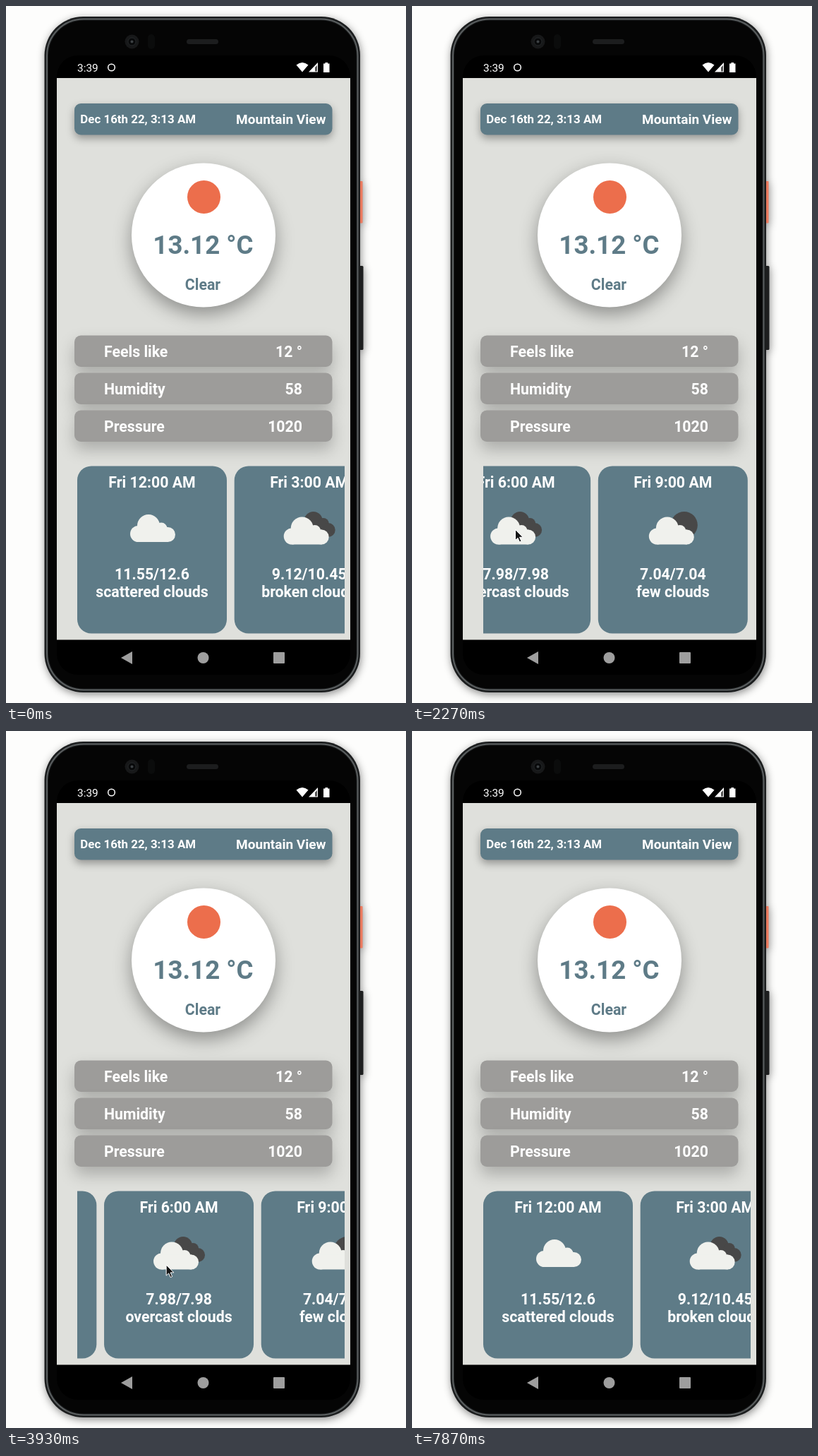
These frames come from a looping animation (567 px wide and 987 px high, 8.87 s). An HTML page:

```html
<!DOCTYPE html>
<html lang="en">
<head>
<meta charset="utf-8">
<title>Weather app</title>
<style>
  html, body { margin: 0; width: 100%; height: 100%; overflow: hidden; background: #fdfdfc; }
  svg { display: block; width: 100%; height: 100%; }
  text { font: 700 21.3px Roboto, sans-serif; fill: #fff; }
  .mid { text-anchor: middle; }
  .end { text-anchor: end; }
  .slate { fill: #5e7b87; }
  .pale { fill: #f0f1ed; }
  .dark { fill: #484848; }
  .phone { filter: drop-shadow(1px 3px 6px rgba(0, 0, 0, .45)); }
  .bar { filter: drop-shadow(0 5px 6px rgba(0, 0, 0, .34)); }
  .dial { filter: drop-shadow(0 10px 13px rgba(0, 0, 0, .36)); }
  .row { fill: #9d9c9a; filter: drop-shadow(0 11px 11px rgba(0, 0, 0, .23)); }
  .rim { fill: none; stroke-width: 2; }
</style>
</head>
<body>
<svg viewBox="0 0 567 987">
  <defs>
    <clipPath id="listArea"><rect x="101" y="651" width="379" height="238"/></clipPath>
    <!-- Cloud: 64 x 39, centred on x, top at y = 0 -->
    <g id="cloud">
      <circle cx="-6" cy="16" r="16"/>
      <circle cx="-20.5" cy="27.5" r="11.5"/>
      <circle cx="12" cy="20" r="8.5"/>
      <circle cx="21.5" cy="28.5" r="10.5"/>
      <rect x="-21" y="18" width="43" height="21"/>
    </g>
    <use id="scattered" class="pale" href="#cloud" x="1" y="720"/>
    <g id="broken">
      <g class="dark">
        <circle cx="6" cy="729" r="13"/>
        <circle cx="20" cy="733" r="8"/>
        <circle cx="27" cy="742" r="10"/>
        <rect y="734" width="27" height="18"/>
      </g>
      <use class="pale" href="#cloud" x="-4" y="723.5"/>
    </g>
    <g id="few">
      <circle class="dark" cx="16" cy="735" r="19"/>
      <use class="pale" href="#cloud" x="-2" y="723.5"/>
    </g>
    <circle id="clear" class="dark" cy="740" r="26.3"/>
  </defs>

  <g class="phone">
    <rect x="500" y="248" width="5.5" height="59.5" rx="1" fill="#ea7a5f"/>
    <rect x="500" y="368" width="6.5" height="119" rx="1.5" fill="#1d1e1f"/>
    <rect x="54.500" y="15" width="447.500" height="957" rx="55" fill="#1b1d1e"/>
  </g>
  <rect class="rim" x="58" y="18.500" width="440.500" height="950" rx="52" stroke="#5b5f60"/>
  <rect x="60" y="20.500" width="436.500" height="946" rx="50" fill="#050505"/>
  <circle cx="178.5" cy="50.5" r="10" fill="#171819"/>
  <circle cx="178.5" cy="50.5" r="5.5" fill="#08090a" stroke="#26292b"/>
  <circle cx="178.5" cy="50.5" r="2" fill="#3c4144"/>
  <rect x="201" y="40" width="10" height="21" rx="5" fill="#0b0c0c"/>
  <rect x="256" y="47" width="45" height="7" rx="3.5" fill="#1c1d1e"/>
  <rect x="72" y="70" width="416" height="877" rx="30"/>
  <rect x="72" y="102" width="416" height="795.5" fill="#dfe0dc"/>

  <text x="101" y="92.5" style="font-size:15.4px;font-weight:400">3:39</text>
  <circle cx="149.5" cy="87" r="4.8" fill="none" stroke="#fff" stroke-width="1.5"/>
  <g fill="#fff">
    <path d="M411.5 83.5Q420 76.5 428.5 83.5L420 93.5Z"/>
    <path d="M429 93.5L442 80V93.5Z"/>
    <path d="M438 87V92.5H441V84Z" fill="#555"/>
    <path d="M450 81.5H452.5V80H456V81.5H458.5V94H450Z"/>
  </g>

  <rect class="slate bar" x="97" y="138" width="365.5" height="44.5" rx="9"/>
  <text x="105.3" y="166" style="font-size:16.9px">Dec 16th 22, 3:13 AM</text>
  <text class="end" x="453.5" y="167" style="font-size:19px">Mountain View</text>

  <circle class="dial" cx="280" cy="324.5" r="102" fill="#fff"/>
  <circle cx="280.5" cy="270.5" r="23.5" fill="#ec6e4c"/>
  <text class="mid slate" x="279.5" y="351" style="font-size:36.7px">13.12 °C</text>
  <text class="mid slate" x="279" y="402">Clear</text>

  <g id="rows"></g>
  <g clip-path="url(#listArea)"><g id="cards"></g></g>

  <g fill="#9e9e9e">
    <path d="M163 923L179 914V932Z"/>
    <circle cx="279.5" cy="923" r="8"/>
    <rect x="379" y="915" width="16" height="16" rx="1"/>
  </g>
  <path id="cursor" d="M0 0V15L3.5 11.8L6 17.5L8.5 16.4L6 10.8H10.7Z" fill="#151515" stroke="#fff"/>
</svg>
<script>
const $ = id => document.getElementById(id);

const readings = [["Feels like", "12 °"], ["Humidity", "58"], ["Pressure", "1020"]];
$("rows").innerHTML = readings.map(([label, value], i) => {
  const y = 466.5 + i * 53;
  return `<rect class="row" x="97" y="${y}" width="365.5" height="44.5" rx="9"/>
    <text x="139" y="${y + 30}">${label}</text>
    <text class="end" x="420" y="${y + 30}">${value}</text>`;
}).join("");

const forecast = [
  ["Fri 12:00 AM", "scattered", "11.55/12.6", "scattered clouds"],
  ["Fri 3:00 AM", "broken", "9.12/10.45", "broken clouds"],
  ["Fri 6:00 AM", "broken", "7.98/7.98", "overcast clouds"],
  ["Fri 9:00 AM", "few", "7.04/7.04", "few clouds"],
  ["Fri 12:00 PM", "clear", "6.27/6.27", "clear sky"]
];
const CARD_PITCH = 222.7;
$("cards").innerHTML = forecast.map(([time, icon, range, sky], i) =>
  `<g transform="translate(${207 + i * CARD_PITCH} 0)">
    <rect class="slate" x="-106" y="651.5" width="212" height="237" rx="20"/>
    <text class="mid" y="682">${time}</text>
    <use href="#${icon}"/>
    <text class="mid" y="812">${range}</text>
    <text class="mid" y="836.5">${sky}</text>
  </g>`).join("");

const LOOP = 8870, STEP = 1000 / 15;
const DRAG = { time: 267, length: 138, drop: 6 };
const FLING = { time: 667, length: 228.5 };
const ENTER = 267, LEAVE = 6190;

// Each flick drags the list with the pointer, then lets it coast.
const flicks = [
  { start: 1060, direction: 1, x: 284.5, y: 704 },
  { start: 1998, direction: 1, x: 284.5, y: 735.5 },
  { start: 3198, direction: -1, x: 209, y: 747 },
  { start: 3893, direction: -1, x: 224, y: 756 }
];

const progress = (t, start, time) => Math.min(1, Math.max(0, (t - start) / time));
const accelerate = p => p * p;
const coast = p => 1 - (1 - p) ** 1.36;
const smooth = p => p * p * (3 - 2 * p);

const scrollAt = t => flicks.reduce((sum, { start, direction }) => sum + direction * (
  DRAG.length * accelerate(progress(t, start, DRAG.time)) +
  FLING.length * coast(progress(t, start + DRAG.time, FLING.time))), 0);

// Pointer path: it glides smoothly between stops, except while dragging.
const stops = [
  { t: ENTER, x: 101, y: 623 },
  { t: 867, x: 284.5, y: 704 },
  ...flicks.flatMap(({ start, direction, x, y }) => [
    { t: start, x, y },
    { t: start + DRAG.time, x: x - direction * DRAG.length, y: y + DRAG.drop, ease: accelerate }
  ]),
  { t: 5470, x: 234, y: 790 },
  { t: 5600, x: 234, y: 790 },
  { t: 5800, x: 281, y: 788 },
  { t: 5933, x: 281, y: 788 },
  { t: 6200, x: 201, y: 736 }
];

function cursorAt(t) {
  const next = Math.max(1, stops.findIndex(stop => stop.t > t));
  const from = stops[next - 1], to = stops[next];
  const p = (to.ease || smooth)(progress(t, from.t, to.t - from.t));
  return [from.x + (to.x - from.x) * p, from.y + (to.y - from.y) * p];
}

function draw(now) {
  // The screen updates 15 times per second.
  const t = Math.floor((now % LOOP + 4) / STEP) * STEP;
  const visible = t > ENTER - 1 && t < LEAVE;
  $("cards").setAttribute("transform", `translate(${-scrollAt(t)} 0)`);
  $("cursor").setAttribute("transform", `translate(${cursorAt(t)})`);
  $("cursor").setAttribute("visibility", visible ? "visible" : "hidden");
}

const start = performance.now();
function tick() {
  draw(performance.now() - start);
  requestAnimationFrame(tick);
}
tick();
</script>
</body>
</html>
```
